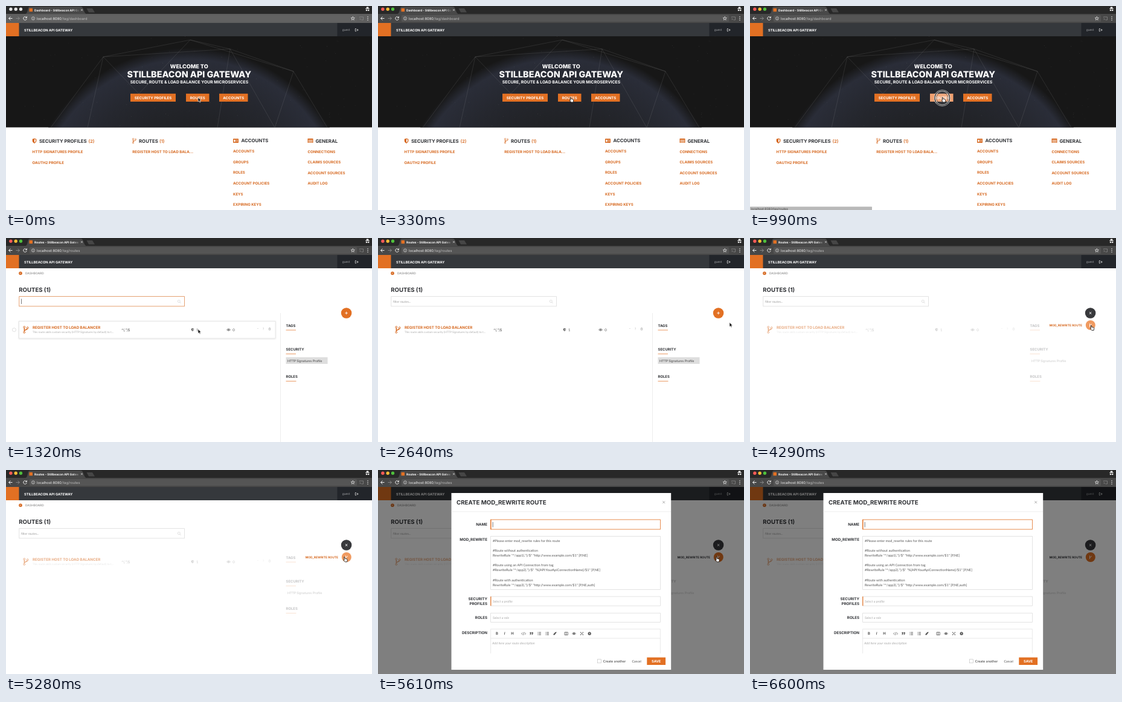
Animation of 606x337 px, one loop 6.93 s. Source, as an HTML page:

```html
<!DOCTYPE html>
<html lang="en">
<head>
<meta charset="utf-8">
<title>API gateway demo</title>
<style>
html, body { margin: 0; width: 100%; height: 100%; overflow: hidden; background: #fff; }
svg { display: block; width: 606px; height: 337px; text-rendering: geometricPrecision; }
.h { font-family: Inter, "Open Sans", sans-serif; }
.b { font-family: Lato, "Open Sans", sans-serif; }
</style>
</head>
<body>
<svg id="stage" viewBox="0 0 606 337" xmlns="http://www.w3.org/2000/svg"></svg>
<script>
const ORANGE = '#e27023', RUST = '#d6681f', INK = '#303236';
const STEP = 330, COUNT = 21;
const BRAND = 'Stillbeacon API Gateway';

// Drawing helpers
const attrs = o => Object.entries(o).map(([k, v]) => ` ${k}="${v}"`).join('');
const esc = s => s.replace(/&/g, '&amp;').replace(/</g, '&lt;');
const rect = (x, y, w, h, fill, more = {}) => `<rect${attrs({ x, y, width: w, height: h, fill, ...more })}/>`;
const circle = (cx, cy, r, fill, more = {}) => `<circle${attrs({ cx, cy, r, fill, ...more })}/>`;
const stroke = (d, color, w = 0.7, more = {}) =>
  `<path${attrs({ d, fill: 'none', stroke: color, 'stroke-width': w, ...more })}/>`;
const shape = (d, fill, more = {}) => `<path${attrs({ d, fill, ...more })}/>`;
const text = (cls, x, y, s, size, fill, more = {}) =>
  `<text${attrs({ class: cls, x, y, 'font-size': size, fill, ...more })}>${esc(s)}</text>`;
const head = (x, y, s, size, fill = INK, more = {}) => text('h', x, y, s, size, fill, { 'font-weight': 700, ...more });
const body = (x, y, s, size, fill = '#555', more = {}) => text('b', x, y, s, size, fill, more);
const group = (id, inner, more = {}) => `<g${attrs({ id, ...more })}>${inner}</g>`;
const at = (x, y, inner, scale = 1) => `<g transform="translate(${x} ${y}) scale(${scale})">${inner}</g>`;
const mid = { 'text-anchor': 'middle' }, end = { 'text-anchor': 'end' }, italic = { 'font-style': 'italic' };

const shield = (x, y, c, s = 1) => at(x, y,
  shape('M0-4L3.3-3V0C3.3 2 1.5 3.4 0 4.2C-1.5 3.4-3.3 2-3.3 0V-3Z', c) +
  shape('M0-2.8L2-2.2V0C2 1.2 1 2.2 0 2.8Z', '#fff'), s);
const branch = (x, y, c, s = 1) => at(x, y,
  stroke('M-2-3V3M-2 1.4C-2-.2 2 .6 2-2', c, 1) +
  [[-2, -3.2], [-2, 3.2], [2, -2.4]].map(p => circle(...p, 1.05, '#fff', { stroke: c, 'stroke-width': 0.7 })).join(''), s);
const cross = (x, y, r, c, w) => stroke(`M${x - r} ${y - r}L${x + r} ${y + r}M${x + r} ${y - r}L${x - r} ${y + r}`, c, w);
const eye = (x, y, c) => at(x, y, stroke('M-3 0Q0-3.4 3 0Q0 3.4-3 0Z', c, 0.8) + circle(0, 0, 1.2, c));

function browser() {
  const title = (id, s) => group(id, text('h', 47, 8.7, s, 4.9, '#fff', { 'font-weight': 700 }));
  const url = (id, path) => group(id, text('h', 51, 22.7, 'localhost:8080', 5.8, '#f4f4f4') +
    text('h', 92.3, 22.7, path, 5.8, '#bdbdbd'));
  const arrow = (x, dir, c) => stroke(`M${x - 3 * dir} 20.5H${x + 3 * dir}M${x} 17.7L${x + 3 * dir} 20.5L${x} 23.3`, c, 1);
  const star = Array.from({ length: 10 }, (_, i) => {
    const r = i % 2 ? 1.3 : 3.2, a = i * Math.PI / 5 - Math.PI / 2;
    return `${(574.3 + r * Math.cos(a)).toFixed(2)} ${(20.6 + r * Math.sin(a)).toFixed(2)}`;
  }).join('L');
  const light = c => ['#fc5b57', '#f3bb36', '#4fc03c'].map((own, i) => circle(7.9 + i * 8.3, 5.2, 2.7, c || own)).join('');
  return rect(0, 0, 606, 28, '#282828') + rect(0, 13, 606, 15, '#484848', { id: 'toolbar' }) +
    shape('M32 13.2Q34 13 35 10L37 3Q38 1 40 1H124Q126 1 127 3L130 10Q131 13 134 13.2Z', '#484848') +
    shape('M133.5 4H143L147 10.5H137Z', '#464646') +
    group('lightsOn', light()) + group('lightsOff', light('#e4e4e4')) +
    rect(38.5, 3.8, 5.5, 5.5, ORANGE) +
    `<g clip-path="url(#tabClip)">${title('tabHome', 'Dashboard - ' + BRAND)}${title('tabRoutes', 'Routes - ' + BRAND)}</g>` +
    rect(110, 2, 12, 10, 'url(#tabFade)') + cross(125.5, 6.6, 1.5, '#ddd', 0.8) +
    arrow(7.5, -1, '#eee') + arrow(19.5, 1, '#858585') +
    stroke('M33.6 18.5A2.8 2.8 0 1 0 34.3 21.2M34.4 17.2V19.5H32', '#eee', 1) +
    rect(39, 15, 542, 11, '#555', { rx: 1.5, id: 'address' }) +
    circle(45, 20.5, 2.6, 'none', { stroke: '#ddd', 'stroke-width': 0.7 }) + stroke('M45 20V22M45 18.8V19.4', '#ddd', 0.7) +
    url('urlHome', '/tag/dashboard') + url('urlRoutes', '/tag/routes') +
    stroke(`M${star}Z`, '#eee', 0.7) +
    stroke('M585.5 19V18H591.5V23H588.7M585.5 20.7A2.4 2.4 0 0 1 587.7 23M585.5 22.3V23', '#8f8f8f', 0.7) +
    [17.8, 20.5, 23.2].map(y => circle(599, y, 0.8, '#ddd')).join('') +
    shape('M595 4.3H602V5H595ZM596.3 4L597 1.6H600L600.8 4Z', '#eee') +
    circle(597, 7, 1.3, '#eee') + circle(600.2, 7, 1.3, '#eee');
}

function siteBar() {
  return rect(0, 28, 606, 22, '#35383c') + rect(548.5, 28, 57.5, 22, '#22252a') + rect(0, 28, 21.5, 22, ORANGE) +
    head(30, 42, BRAND.toUpperCase(), 5.7, '#fff') + body(557, 41.3, 'guest', 5.1, '#a7a9ac') +
    stroke('M580 37.5H578.3V41.7H580M580 39.6H583M581.5 38L583.2 39.6L581.5 41.2', '#ddd', 0.8);
}

function hero() {
  let seed = 7;
  const rnd = () => (seed = seed * 16807 % 2147483647) / 2147483647;
  let stars = '';
  for (let i = 0; i < 130; i++)
    stars += circle((rnd() * 606).toFixed(1), (50 + rnd() * 150).toFixed(1), 0.35, '#fff', { opacity: (0.05 + rnd() * 0.2).toFixed(2) });
  const net = 'M74 201L161 84L305 56L371 71L476 108L532 201M161 84L371 71M161 84L135 201M161 84L225 150' +
    'M305 56L215 150M305 56L476 108M371 71L350 201M371 71L445 201M476 108L445 201';
  const button = (x, w, s, id) => rect(x, 144.8, w, 13.2, ORANGE, id ? { id } : {}) +
    head(x + w / 2, 153.6, s, 6.1, '#fff', mid);
  return `<g clip-path="url(#heroClip)">` + rect(0, 50, 606, 151, '#171717') +
    circle(303, 341, 272, 'url(#globe)') + stars +
    stroke(net, '#c9c9c9', 0.5, { opacity: 0.25 }) + '</g>' +
    head(303.3, 103.2, 'WELCOME TO', 9.1, '#fff', { ...mid, 'font-weight': 800 }) +
    head(303.3, 117.9, BRAND.toUpperCase(), 14.4, '#fff', { ...mid, 'font-weight': 800 }) +
    head(303.5, 128.4, 'SECURE, ROUTE & LOAD BALANCE YOUR MICROSERVICES', 6.85, '#fff', mid) +
    button(206, 75, 'SECURITY PROFILES') + button(298, 38.5, 'ROUTES', 'routesBtn') + button(353, 47.5, 'ACCOUNTS');
}

function dashboard() {
  const column = (x, y, gap, items) => items.map((s, i) => head(x, y + i * gap, s, 6.1, RUST)).join('');
  const title = (x, y, s, n, nx) => head(x, y, s, 7.8) + (n ? head(nx, y, n, 7.3, RUST, { 'font-weight': 600 }) : '');
  const idCard = rect(376, 219.3, 9, 6.6, RUST, { rx: 0.6 }) + rect(377.3, 221, 2.6, 3.4, '#fff') +
    stroke('M381 221.6H384M381 223.6H384', '#fff', 0.7);
  const list = rect(499.5, 219, 9, 7, RUST, { rx: 0.6 }) + stroke('M500.5 221.5H507.5M500.5 223.2H507.5M500.5 224.9H507.5', '#fff', 0.8);
  return rect(0, 28, 606, 309, '#fff') + hero() +
    shield(47, 222.8, RUST) + title(55, 225.6, 'SECURITY PROFILES', '(2)', 136.6) +
    branch(212.5, 222.8, RUST) + title(220, 225.6, 'ROUTES', '(1)', 254) +
    idCard + title(389.5, 225.3, 'ACCOUNTS') + list + title(512.5, 225.5, 'GENERAL') +
    column(43.6, 243.2, 17.5, ['HTTP SIGNATURES PROFILE', 'OAUTH2 PROFILE']) +
    column(209.3, 243.2, 17.5, ['REGISTER HOST TO LOAD BALA...']) +
    column(376, 242.3, 17.55, ['ACCOUNTS', 'GROUPS', 'ROLES', 'ACCOUNT POLICIES', 'KEYS', 'EXPIRING KEYS']) +
    column(499.5, 242.5, 17.6, ['CONNECTIONS', 'CLAIMS SOURCES', 'ACCOUNT SOURCES', 'AUDIT LOG']);
}

function routes() {
  const side = (y, s, w) => head(463.5, y, s, 5.95) + stroke(`M463.5 ${y + 5.5}h${w}`, ORANGE, 0.7);
  const frame = rect(21.5, 137.5, 424.5, 28.3, '#fff', { stroke: '#e2e2e2', 'stroke-width': 0.8, filter: 'url(#soft)' }) +
    circle(13.5, 151.7, 3, '#fff', { stroke: '#ccc', 'stroke-width': 0.6 });
  const details =
    body(44, 157.2, 'This route adds custom security (HTTP Signatures by default) to t...', 4.6, '#aaa') +
    body(191, 153.8, '^(.*)$', 6, '#555') +
    shield(309, 151.5, '#555', 0.6) + body(315, 153.8, '1', 6) + eye(368.5, 151.6, '#666') + body(375.3, 153.8, '0', 6) +
    circle(417, 149.5, 0.6, '#bbb') + body(425, 151.8, '?', 5, '#aaa') +
    stroke('M434.8 149H438.2M435.3 149.3V152H437.7V149.3M436 148.4H437', '#999', 0.6) +
    side(146.6, 'TAGS', 16.5) + side(186, 'SECURITY', 16.5) + side(231, 'ROLES', 17);
  return rect(0, 50, 606, 287, '#fff') +
    circle(24, 58.3, 2.8, RUST) + stroke('M24.6 56.9L23.2 58.3L24.6 59.7', '#fff', 0.7) +
    head(32, 60.1, 'DASHBOARD', 4.9, '#999', { 'font-weight': 600 }) +
    head(21.3, 89.3, 'ROUTES (1)', 9.6) +
    rect(21.8, 96.6, 273.6, 16.2, '#fff', { id: 'search', 'stroke-width': 0.8 }) +
    group('hint', body(25, 106.6, 'filter routes...', 5.1, '#999')) +
    rect(25.2, 100.5, 0.6, 8.5, '#222', { id: 'searchCaret' }) +
    circle(286.3, 104.5, 2, 'none', { stroke: '#ccc', 'stroke-width': 0.6 }) + stroke('M287.7 106L289.4 107.8', '#ccc', 0.7) +
    group('frame', frame) + group('divider', stroke('M454.5 124V337', '#e5e5e5', 0.7)) +
    group('details', details + rect(463.5, 197, 69, 11, '#dedede', { id: 'chip' }) +
      body(466, 204.5, 'HTTP Signatures Profile', 5.5, '#444')) +
    group('routeName', branch(33, 151.5, RUST, 1.35) + head(44, 150.2, 'REGISTER HOST TO LOAD BALANCER', 6.15, RUST)) +
    group('menuSmall', circle(563.7, 142, 6.6, '#f2ac80') + branch(563.7, 142, '#fff', 0.6) +
      head(552, 143.6, 'MOD_REWRITE ROUTE', 4.13, '#444', end)) +
    group('menu', circle(563.8, 144, 8, ORANGE, { id: 'menuDot' }) + stroke('M562.5 141.3V147M562.5 145C562.5 143.8 565.4 144.4 565.4 141.8', '#fff', 0.9) +
      head(550, 145.8, 'MOD_REWRITE ROUTE', 4.93, INK, { ...end, id: 'menuLabel' })) +
    group('fabOpen', circle(563.6, 124, 8.8, ORANGE) + stroke('M561.3 124H565.9M563.6 121.7V126.3', '#fff', 0.9)) +
    group('fabClose', circle(563.6, 124, 8.8, '#38393c') + cross(563.6, 124, 1.7, '#fff', 1));
}

function modal() {
  const label = (y, s) => head(181, y, s, 6.2, INK, end);
  const box = (y, h, c = '#ddd') => rect(186.6, y, 280.8, h, '#fff', { stroke: c, 'stroke-width': 0.8 });
  const rules = ['#Please enter mod_rewrite rules for this route', '', '#Route without authentication',
    'RewriteRule "^/app1(.*)/$" "http://www.example.com/$1" [P,NE]', '', '#Route using an API Connection from tag',
    '#RewriteRule "^/app2(.*)/$" "%{API:YourApiConnectionName}/$1" [P,NE]', '', '#Route with authentication',
    'RewriteRule "^/app3(.*)/$" "http://www.example.com/$1" [P,NE,auth]'];
  const dark = '#555';
  const lines = x => stroke(`M${x - 1} 268.2h4M${x - 1} 270.2h4M${x - 1} 272.2h4M${x - 2.8} 268.2h1M${x - 2.8} 270.2h1M${x - 2.8} 272.2h1`, dark, 0.8);
  const tools = head(197, 272.4, 'B', 6, dark, mid) + head(209.5, 272.4, 'I', 6, dark, { ...mid, ...italic }) +
    head(222.5, 272.4, 'H', 6, dark, mid) +
    stroke('M239.5 268.5L237.6 270.3L239.5 272.1M242.8 268.5L244.7 270.3L242.8 272.1M241.8 267.8L240.5 272.8', dark, 0.7) +
    shape('M251.5 268H253.6V270.3Q253.6 272.3 251.5 272.5V271.5Q252.3 271.2 252.3 270.3H251.5ZM254.6 268H256.7V270.3Q256.7 272.3 254.6 272.5V271.5Q255.4 271.2 255.4 270.3H254.6Z', dark) +
    lines(267) + lines(280) + shape('M290.2 271.5L293.6 267.8H296L292.5 272.5H290.5Z', dark) +
    stroke('M309 268H314.3V272.5H309ZM311.6 268V272.5', dark, 0.8) + eye(324.5, 270.2, dark) +
    cross(337.5, 270.2, 2, dark, 0.8) + stroke('M335.3 269V268H336.3M338.7 268H339.7V269M335.3 271.5V272.5H336.3M338.7 272.5H339.7V271.5', dark, 0.8) +
    circle(350.2, 270.2, 2.6, dark) + head(350.2, 271.8, '?', 4.2, '#fff', mid);
  return rect(0, 28, 606, 309, '#000', { opacity: 0.5 }) +
    rect(121.5, 38, 363.7, 292, '#fff') + head(130, 57, 'CREATE MOD_REWRITE ROUTE', 9.75) +
    cross(473.2, 53.3, 1.9, '#aaa', 1) + stroke('M121.5 68.8H485', '#e8e8e8') +
    label(92.3, 'NAME') + box(82, 16, ORANGE) + rect(186.2, 82, 1.3, 16, ORANGE) +
    rect(189.8, 86, 0.6, 8.5, '#222', { id: 'nameCaret' }) +
    label(117.4, 'MOD_REWRITE') + box(109.5, 88) +
    rules.map((s, i) => body(190, 118.5 + i * 8.14, s, 5.55, '#555')).join('') +
    label(215, 'SECURITY') + label(222.7, 'PROFILES') + box(209, 15.3) + rect(186.2, 209, 1.2, 15.3, ORANGE) +
    body(190, 218.8, 'Select a profile', 5.4, '#aaa', italic) +
    label(246.2, 'ROLES') + box(236.3, 15.2) + body(190, 246, 'Select a role', 5.4, '#aaa', italic) +
    label(271.2, 'DESCRIPTION') + stroke('M186.6 303V262.8H467.4V303M186.6 278H467.4', '#e2e2e2', 0.8) + tools +
    body(189, 287.7, 'Add here your route description', 5.45, '#aaa', italic) +
    rect(363.5, 312.8, 6, 6, '#fff', { stroke: '#bbb', 'stroke-width': 0.6 }) +
    body(372.8, 317.7, 'Create another', 5.7, '#333') + body(420.5, 317.7, 'Cancel', 5.2, '#444') +
    rect(445.3, 309.6, 30.8, 12.4, ORANGE) + head(460.7, 317.9, 'SAVE', 5.8, '#fff', mid);
}

const defs = `<defs>
<clipPath id="tabClip"><rect x="46" y="1" width="75" height="12"/></clipPath>
<clipPath id="heroClip"><rect y="50" width="606" height="150.5"/></clipPath>
<linearGradient id="tabFade"><stop stop-color="#484848" stop-opacity="0"/><stop offset="1" stop-color="#484848"/></linearGradient>
<radialGradient id="globe"><stop offset=".5" stop-color="#202124"/><stop offset=".75" stop-color="#25272e"/>
<stop offset=".93" stop-color="#2a2d38"/><stop offset="1" stop-color="#171717"/></radialGradient>
<filter id="soft" x="-5%" y="-20%" width="110%" height="150%"><feDropShadow dx="0" dy=".6" stdDeviation=".8" flood-opacity=".15"/></filter>
</defs>`;

const ring = circle(318.3, 152, 12.3, '#fff', { 'fill-opacity': 0.1, stroke: '#fff', 'stroke-width': 2.6 }) +
  circle(318.3, 152, 12.3, 'none', { stroke: '#222', 'stroke-width': 1.3 }) +
  circle(318.3, 152, 9.6, 'none', { stroke: '#333', 'stroke-width': 0.6 });
const edge = { stroke: '#fff', 'stroke-width': 0.6, 'stroke-linejoin': 'round' };
const pointer = group('arrow', shape('M0 0V7.2L1.7 5.7L2.9 8.3L4.1 7.8L2.9 5.2H5.1Z', '#111', edge)) +
  group('hand', shape('M.2 0Q1.2-.5 1.5.7L2 2.6L4.8 3.2Q5.9 3.5 5.7 4.8L5.2 8H1.8L-.7 5.2Q-.7 4.3.6 4.9Z', '#fff',
    { stroke: '#111', 'stroke-width': 0.8, 'stroke-linejoin': 'round' }));

document.getElementById('stage').innerHTML = defs + rect(0, 0, 606, 337, '#fff') +
  group('home', dashboard()) + group('routesPage', routes()) + siteBar() + group('modal', modal()) +
  group('status', rect(0, 331.5, 202, 6, '#b9b9b9', { rx: 0.8 }) + text('h', 1.5, 337, 'localhost:8080/tag/routes', 5, '#444')) +
  browser() + group('ring', ring) + group('cursor', pointer);

const el = id => document.getElementById(id);
const show = (id, on) => el(id).setAttribute('visibility', on ? 'inherit' : 'hidden');
const set = (id, name, value) => el(id).setAttribute(name, value);

// Pointer stops: first step, x, y, kind
const stops = [[0, 318, 151, 'arrow'], [1, 318, 151, 'hand'], [4, 318, 150.5, 'arrow'], [6, 333, 149, 'arrow'],
  [7, 588, 145, 'arrow'], [8, 582, 139.5, 'arrow'], [9, 571, 123.8, 'hand'], [13, 564, 144.5, 'hand'],
  [14, 561, 144, 'hand'], [15, 559.5, 143.8, 'hand'], [18, 553, 144, 'arrow'], [19, 0, 0, '']];

function draw(n) {
  const active = n > 0, home = n < 4, focused = n < 7, open = n >= 11, hover = n >= 13 && n < 17;
  show('lightsOn', active);
  show('lightsOff', !active);
  set('toolbar', 'fill', active ? '#484848' : '#5f5f5f');
  set('address', 'fill', active ? '#555' : '#626262');
  for (const id of ['home', 'tabHome', 'urlHome']) show(id, home);
  for (const id of ['routesPage', 'tabRoutes', 'urlRoutes']) show(id, !home);
  show('ring', n === 3);
  show('status', n === 3);
  set('routesBtn', 'fill', n === 3 ? '#f0a070' : ORANGE);
  set('search', 'stroke', focused ? '#df8a50' : '#ddd');
  show('searchCaret', n === 4);
  show('hint', !focused);
  show('frame', focused);
  show('divider', !open);
  show('chip', !open);
  set('details', 'opacity', open ? 0.28 : 1);
  set('routeName', 'opacity', open ? 0.55 : 1);
  show('fabOpen', n < 10);
  show('fabClose', n >= 10);
  show('menuSmall', n === 11);
  show('menu', n >= 12);
  set('menuDot', 'fill', hover ? '#f09a60' : ORANGE);
  set('menuLabel', 'fill', hover ? RUST : INK);
  show('modal', n >= 17);
  show('nameCaret', n === 17 || n === 20);
  const [, x, y, kind] = stops.filter(s => s[0] <= n).pop();
  set('cursor', 'transform', `translate(${x} ${y})`);
  show('arrow', kind === 'arrow');
  show('hand', kind === 'hand');
}

const start = performance.now();
let last = -1;
function tick() {
  const n = Math.floor((performance.now() - start) / STEP) % COUNT;
  if (n !== last) draw(last = n);
  requestAnimationFrame(tick);
}
tick();
</script>
</body>
</html>
```
